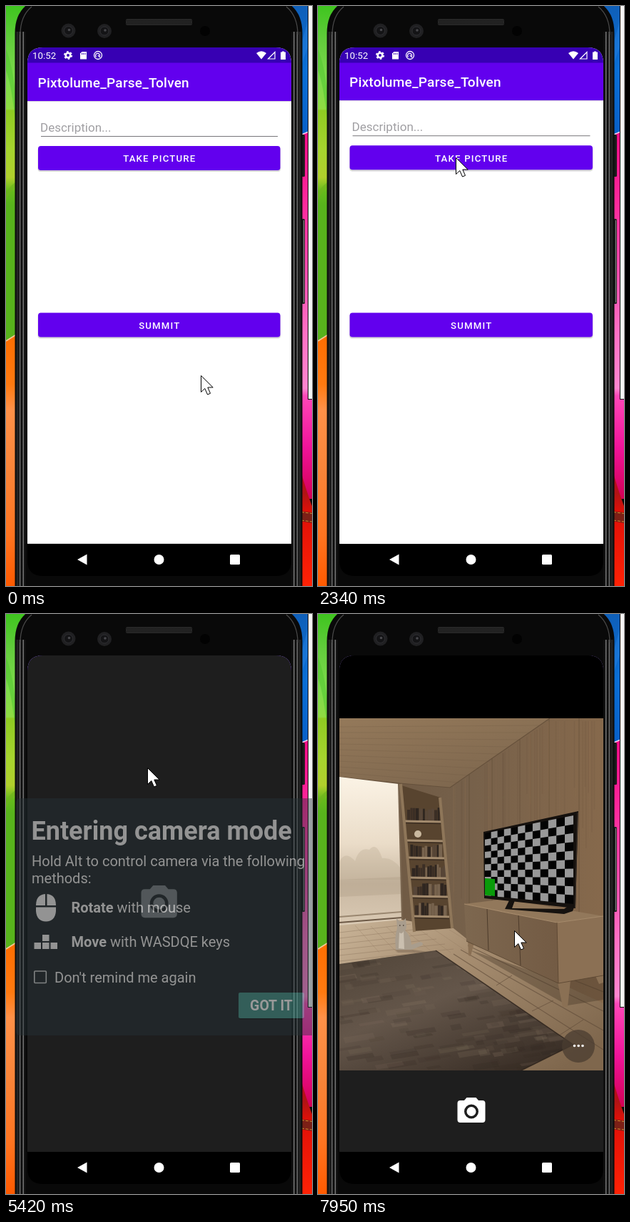
Animation, 429 px wide and 812 px high, one loop 8000 ms. Source, as an HTML page:

```html
<!DOCTYPE html>
<html lang="en">
<head>
<meta charset="utf-8">
<title>Camera demo</title>
<style>
html, body { margin: 0; width: 100%; height: 100%; overflow: hidden; background: #0a0a0a; }
svg { display: block; }
text { font-family: Roboto, "Noto Sans", sans-serif; }
</style>
</head>
<body>
<svg id="stage" width="429" height="812" viewBox="0 0 429 812">
  <defs>
    <linearGradient id="leftWall" x2="0" y2="1">
      <stop offset="0" stop-color="#3fc51f"/><stop offset=".1" stop-color="#62cc3c"/>
      <stop offset=".22" stop-color="#7fdc4c"/><stop offset=".3" stop-color="#8fdb42"/>
      <stop offset=".305" stop-color="#8fcb22"/><stop offset=".42" stop-color="#a6d42e"/>
      <stop offset=".5" stop-color="#b0cf2c"/><stop offset=".54" stop-color="#66bb1c"/>
      <stop offset=".58" stop-color="#58b31c"/>
    </linearGradient>
    <linearGradient id="orange" x2="0" y2="1">
      <stop offset="0" stop-color="#ff6d00"/><stop offset=".2" stop-color="#ff7a10"/>
      <stop offset=".3" stop-color="#ff9148"/><stop offset=".55" stop-color="#f98438"/>
      <stop offset=".8" stop-color="#ff7420"/><stop offset="1" stop-color="#ff5a00"/>
    </linearGradient>
    <linearGradient id="blue" x2="0" y2="1">
      <stop offset="0" stop-color="#0f5fb8"/><stop offset=".5" stop-color="#0a6fd6"/><stop offset="1" stop-color="#0860c8"/>
    </linearGradient>
    <linearGradient id="pink" x2="0" y2="1">
      <stop offset="0" stop-color="#ee0a84"/><stop offset=".2" stop-color="#ff2a9c"/>
      <stop offset=".38" stop-color="#f54cae"/><stop offset=".55" stop-color="#ff70c4"/>
      <stop offset=".7" stop-color="#ff86cf"/><stop offset=".72" stop-color="#ff48b8"/>
      <stop offset=".86" stop-color="#f0149a"/><stop offset="1" stop-color="#d20055"/>
    </linearGradient>
    <linearGradient id="red" x2="0" y2="1">
      <stop offset="0" stop-color="#c3002c"/><stop offset=".25" stop-color="#b01414"/>
      <stop offset=".4" stop-color="#e01008"/><stop offset="1" stop-color="#ff2205"/>
    </linearGradient>
    <linearGradient id="rim">
      <stop offset="0" stop-color="#060606"/><stop offset=".2" stop-color="#2b2b2b"/>
      <stop offset=".32" stop-color="#0a0a0a"/><stop offset=".42" stop-color="#777"/>
      <stop offset=".5" stop-color="#111"/><stop offset=".62" stop-color="#0b0b0b"/>
      <stop offset=".7" stop-color="#8d8d8d"/><stop offset=".78" stop-color="#151515"/>
      <stop offset="1" stop-color="#070707"/>
    </linearGradient>
    <linearGradient id="ceiling" x2=".6" y2="1">
      <stop offset="0" stop-color="#94795a"/><stop offset="1" stop-color="#7e674e"/>
    </linearGradient>
    <linearGradient id="wall">
      <stop offset="0" stop-color="#6b553f"/><stop offset=".45" stop-color="#75604a"/><stop offset="1" stop-color="#86694c"/>
    </linearGradient>
    <linearGradient id="window" x2="0" y2="1">
      <stop offset="0" stop-color="#fbf3e5"/><stop offset=".45" stop-color="#eadcc8"/>
      <stop offset=".72" stop-color="#c9b8a2"/><stop offset="1" stop-color="#d9c9b3"/>
    </linearGradient>
    <linearGradient id="floor" x2="1" y2=".8">
      <stop offset="0" stop-color="#c9b498"/><stop offset=".4" stop-color="#a78e71"/><stop offset="1" stop-color="#7f674d"/>
    </linearGradient>
    <linearGradient id="rug" x2=".8" y2="1">
      <stop offset="0" stop-color="#504438"/><stop offset=".45" stop-color="#64564a"/><stop offset="1" stop-color="#382d25"/>
    </linearGradient>
    <linearGradient id="front">
      <stop offset="0" stop-color="#7d674f"/><stop offset="1" stop-color="#735b44"/>
    </linearGradient>
    <clipPath id="screen"><path d="M30 753V80Q30 58 52 58H378Q400 58 400 80V753Z"/></clipPath>
    <clipPath id="photoBox"><rect x="30" y="146" width="370" height="493"/></clipPath>
    <clipPath id="rugBox"><path d="M30 490 165 471 358 603 285 639H30Z"/></clipPath>
    <g id="cam" fill-rule="evenodd">
      <path d="M13 0H26L29.500 4H35Q39 4 39 8V31Q39 35 35 35H4Q0 35 0 31V8Q0 4 4 4H9.500ZM19.500 9.500A10 10 0 1 0 19.500 29.500A10 10 0 1 0 19.500 9.500ZM19.500 13A6.500 6.500 0 1 1 19.500 26A6.500 6.500 0 1 1 19.500 13Z"/>
    </g>
  </defs>

  <!-- desktop -->
  <g id="desk">
    <rect width="40" height="480" fill="url(#leftWall)"/>
    <path d="M0 262Q8 248 16 246V252Q8 256 0 272Z" fill="#6fb51e" opacity=".7"/>
    <path d="M0 60Q10 85 14 130V170Q8 110 0 90Z" fill="#4fc62e" opacity=".5"/>
    <path d="M0 469 16 459V812H0Z" fill="url(#orange)"/>
    <path d="M0 469 16 459" stroke="#f5c99a" stroke-width="1.500"/>
    <rect x="390" width="39" height="180" fill="url(#blue)"/>
    <path d="M429 0V40L412 90V60Z" fill="#2c86e4" opacity=".4"/>
    <path d="M410 182 429 174V690H410Z" fill="url(#pink)"/>
    <path d="M410 182 429 174" stroke="#f7d6ea" stroke-width="1.500"/>
    <path d="M410 640Q420 676 429 700V812H410Z" fill="url(#red)"/>
    <path d="M412 707 429 709V724L412 721Z" fill="#7c2016"/>
    <path d="M414 708.500 429 710.500M414 720 429 722" stroke="#d08a2c" stroke-dasharray="4 2"/>
    <rect x="423.500" y="-2" width="10" height="552.500" fill="#f7f7f7" stroke="#111"/>
  </g>

  <!-- phone -->
  <rect x="413" y="180" width="6" height="59" rx="1.500" fill="#1c1c1c"/>
  <rect x="413" y="298" width="6" height="119" rx="1.500" fill="#222"/>
  <path d="M417.500 300V415" stroke="#888"/>
  <path d="M12.500 830V38Q12.500 8 34 -5H394Q415.500 8 415.500 38V830Z" fill="#090909"/>
  <rect x="13" y="36" width="16" height="776" fill="url(#rim)"/>
  <rect x="-415" y="36" width="16" height="776" fill="url(#rim)" transform="scale(-1 1)"/>
  <path d="M20 40Q20 14 36 1M409 40Q409 14 393 1" fill="none" stroke="#4a4a4a" stroke-width="1.200"/>
  <g id="sensors"></g>
  <path d="M30 750H400V776Q400 798 378 798H52Q30 798 30 776Z" fill="#000"/>

  <g clip-path="url(#screen)">
    <g id="app">
      <rect x="30" y="58" width="370" height="695" fill="#fff"/>
      <g id="page">
        <rect x="28" y="76" width="374" height="57" fill="#6200ee"/>
        <rect x="28" y="133" width="374" height="1" fill="#d5d1dc"/>
        <text x="44.500" y="113.500" font-size="19" font-weight="500" letter-spacing=".24" fill="#fff">Pixtolume_Parse_Tolven</text>
        <text x="48" y="175.500" font-size="17" fill="#a09fa3">Description...</text>
        <rect x="49" y="182" width="332" height="1" fill="#77767a"/>
        <g id="buttons"></g>
        <rect x="28" y="752" width="374" height="1" fill="#ddd"/>
      </g>
      <rect x="30" y="58" width="370" height="21.500" fill="#3700b3"/>
      <text x="37" y="74" font-size="13.300" fill="#fff">10:52</text>
      <circle cx="87" cy="69" r="3.300" fill="none" stroke="#fff" stroke-width="2.600"/>
      <circle cx="87" cy="69" r="5.200" fill="none" stroke="#fff" stroke-width="1.700" stroke-dasharray="2.720"/>
      <path d="M106.500 64H113V74.500H104V66.500Z" fill="#fff"/>
      <path d="M106.500 66V68M108.700 66V68M111 66V68" stroke="#3700b3"/>
      <circle cx="129" cy="69" r="5.500" fill="none" stroke="#fff" stroke-width="1.300"/>
      <path d="M126.500 71.500A3 3 0 1 1 131.500 70M129 69 132 72" fill="none" stroke="#fff" stroke-width="1.300"/>
      <path d="M351 66Q358 60.500 365 66L358 74.500Z" fill="#fff"/>
      <path d="M377 64.500V74H367.500Z" fill="none" stroke="#fff" stroke-width="1.200"/>
      <path d="M385 64.500H387V63.500H390V64.500H392V75H385Z" fill="#fff"/>
    </g>
    <g id="dark">
      <rect x="30" y="58" width="370" height="695" fill="#1e1e1e"/>
      <use id="hint" href="#cam" transform="translate(189.500 380) scale(1.290)" fill="#757575"/>
    </g>
    <g id="photo">
      <rect x="30" y="58" width="370" height="90" fill="#000"/>
      <rect x="30" y="639" width="370" height="114" fill="#1e1e1e"/>
      <g id="room" clip-path="url(#photoBox)"></g>
      <circle cx="365" cy="605" r="23" fill="#4a3c31" opacity=".75"/>
      <path d="M359.500 604.500h.01M365.200 604.500h.01M371 604.500h.01" stroke="#fff" stroke-width="3.600" stroke-linecap="round"/>
      <use href="#cam" transform="translate(195.500 677)" fill="#fff"/>
    </g>
  </g>
  <g fill="#fff">
    <path d="M100 775 113.500 767.500V782.500Z"/>
    <circle cx="214.500" cy="775" r="7"/>
    <rect x="314" y="768" width="14" height="14" rx="1.500"/>
  </g>

  <g id="dialog">
    <path d="M20 258H429V590H20Q14 590 14 584V264Q14 258 20 258Z" fill="#263238" opacity=".8"/>
    <g fill="#f4f4f4">
      <text x="35.500" y="316" font-size="36" font-weight="700">Entering camera mode</text>
      <g font-size="20">
        <text x="36" y="353">Hold Alt to control camera via the following</text>
        <text x="36" y="377">methods:</text>
        <text x="91.500" y="418"><tspan font-weight="700">Rotate</tspan> with mouse</text>
        <text x="91.500" y="466"><tspan font-weight="700">Move</tspan> with WASDQE keys</text>
        <text x="68" y="516">Don't remind me again</text>
      </g>
      <path d="M55 392V408H42Q42 393 55 392ZM57.500 392Q70 393 70 408H57.500ZM42 410.500H70V416Q69 430 56 430.500Q43 430 42 416Z"/>
      <path d="M51 449H60.500V458H51ZM39.500 460H49V469H39.500ZM51 460H60.500V469H51ZM62.500 460H72V469H62.500Z"/>
    </g>
    <rect x="39.800" y="500" width="16.500" height="16.500" rx="1" fill="none" stroke="#cfd3d5" stroke-width="1.600"/>
    <rect x="326" y="531.500" width="92" height="36" rx="2" fill="#000" opacity=".25"/>
    <rect id="gotIt" x="326" y="530" width="92" height="36" rx="2" fill="#45938a"/>
    <text x="372" y="555" font-size="19.500" font-weight="700" fill="#fff" text-anchor="middle">GOT IT</text>
  </g>

  <path id="cursor" d="M.5 .5V23.500L5.800 18.500 9.500 27 13.500 25.300 9.800 17H17.200Z" fill="#fff" stroke="#000" stroke-linejoin="round"/>
</svg>
<script>
const $ = id => document.getElementById(id);
const NS = 'http://www.w3.org/2000/svg';
const LOOP = 8000;

function add(parent, tag, attrs, text) {
  const el = document.createElementNS(NS, tag);
  for (const k in attrs) el.setAttribute(k, attrs[k]);
  if (text) el.textContent = text;
  parent.appendChild(el);
  return el;
}

let seed = 7;
const rnd = () => (seed = (seed * 16807) % 2147483647) / 2147483647;

function buildSensors() {
  const g = $('sensors');
  for (const [x, y] of [[87.5, 34.5], [138, 35]]) {
    add(g, 'circle', { cx: x, cy: y, r: 10, fill: '#202022' });
    add(g, 'circle', { cx: x, cy: y, r: 6, fill: '#141416', stroke: '#2f2f33' });
    add(g, 'circle', { cx: x + 1, cy: y - 1, r: 1.8, fill: '#48484c' });
  }
  add(g, 'circle', { cx: 279, cy: 35, r: 7, fill: '#020202' });
  add(g, 'rect', { x: 168, y: 18, width: 93, height: 9, rx: 2, fill: '#262626' });
  add(g, 'path', { d: 'M169 20.5H260M170 22.500H260M169 24.500H260', stroke: '#151515', 'stroke-dasharray': '1 1' });
}

function buildButtons() {
  const g = $('buttons');
  for (const [y, label] of [[196, 'TAKE PICTURE'], [429.5, 'SUMMIT']]) {
    add(g, 'rect', { x: 44.5, y: y + 2, width: 340.5, height: 34, rx: 4, fill: '#000', opacity: .16 });
    add(g, 'rect', { x: 45, y, width: 339.5, height: 34, rx: 3.8, fill: '#6200ee' });
    add(g, 'text', {
      x: 215.3, y: y + 22.3, fill: '#fff', 'font-size': 13.2, 'font-weight': 500,
      'letter-spacing': 1.18, 'text-anchor': 'middle'
    }, label);
  }
}

function buildRoom() {
  const g = $('room');
  const fill = (d, color, opacity = 1) => add(g, 'path', { d, fill: color, opacity });
  const line = (d, color, width = 1, opacity = 1) =>
    add(g, 'path', { d, fill: 'none', stroke: color, 'stroke-width': width, opacity });

  fill('M30 146H400V639H30Z', 'url(#wall)');
  fill('M30 146H325L185 243 115 237 30 228Z', 'url(#ceiling)');
  for (let i = 0; i < 9; i++) {
    line(`M30 ${158 + i * 8}L${310 - i * 14} ${156 + i * 10}`, '#6a543e', .8, .3);
  }
  line('M325 146 185 243 115 237 30 228', '#5d4935', 1.2, .7);
  for (const x of [212, 244, 283, 324, 366]) line(`M${x} ${Math.max(146, 243 - (x - 185) * .69)}V430`, '#584530', 1, .45);
  for (let i = 0; i < 45; i++) {
    const x = 190 + rnd() * 210, y = Math.max(150, 245 - (x - 185) * .68);
    line(`M${x} ${y}v${80 + rnd() * 110}`, rnd() < .5 ? '#947858' : '#5f4a36', 1.5, .13);
  }

  // floor
  fill('M30 432 117 428 190 440 215 460 400 545V639H30Z', 'url(#floor)');
  for (let i = 0; i < 6; i++) line(`M30 ${446 + i * 8}L${130 + i * 12} ${434 + i * 7}`, '#8b745c', .8, .55);
  for (let i = 0; i < 7; i++) line(`M${52 + i * 22} ${436 + i}l${34 + i * 3} ${38 - i}`, '#8b745c', .7, .4);
  for (let i = 0; i < 4; i++) line(`M${190 + i * 10} ${476 - i * 6}L400 ${610 - i * 27}`, '#5d4936', 1.2, .6);
  line('M300 556 330 541M338 590 372 568M250 520 272 506', '#5d4936', 1, .6);

  // window
  fill('M30 228 113 238 118 428 30 436Z', 'url(#window)');
  fill('M30 347Q38 330 52 346 58 326 72 330 82 318 90 342 104 340 116 356V372H30Z', '#b9a78f', .32);
  fill('M30 372 117 368V392L30 396Z', '#ab9a84', .35);
  line('M30 424 117 417', '#9a8770', 2);
  line('M30 432 118 425', '#6d5a47', 2);
  line('M113 238 118 428', '#7a6650', 2);

  // ladder shelf
  fill('M117 240 172 257 188 440 134 444Z', '#58442f');
  [290, 317, 341, 369, 395, 423].forEach((y, i) => {
    const x0 = 121 + i * 2.2, x1 = 174 + i * 2;
    if (i !== 1) {
      for (let x = x0 + 4; x < x1 - 4;) {
        const w = 2 + rnd() * 3, h = 13 + rnd() * 6;
        add(g, 'rect', { x, y: y - h, width: w, height: h, fill: ['#3b2e25', '#574638', '#78644f', '#2f2620'][rnd() * 4 | 0] });
        x += w + .4;
      }
    }
    line(`M${x0} ${y}L${x1} ${y + 1}`, '#a38b6e', 3);
    line(`M${x0} ${y + 2.500}L${x1} ${y + 3.500}`, '#3c2e22', 1.5);
  });
  add(g, 'circle', { cx: 140, cy: 308, r: 5, fill: '#c9b89f' });
  line('M116 238 135 445', '#8e7659', 4);
  line('M171 257 188 440', '#8e7659', 4);

  // cat
  fill('M109 470Q107 452 111 440L110 426 114 430H119L123 426 124 437Q124 441 122 443 130 450 131 463L143 459Q149 460 146 464L131 470Z', '#a99d8d');
  fill('M113 468 114 446Q118 449 120 444L121 469Z', '#cabfaf');
  line('M114 436h1.500M119 436h1.500', '#4d4339', 1.3);
  fill('M108 470H134L160 474H112Z', '#7b6752', .5);

  // rug
  fill('M30 490 165 471 358 603 285 639H30Z', 'url(#rug)');
  const rug = add(g, 'g', { 'clip-path': 'url(#rugBox)' });
  for (let i = 0; i < 170; i++) {
    const x = 20 + rnd() * 320, y = 472 + rnd() * 165, w = 10 + rnd() * 32;
    add(rug, 'path', {
      d: `M${x} ${y}l${w} ${-w * .16}l3 ${3 + rnd() * 5}l${-w} ${w * .16}Z`,
      fill: rnd() < .45 ? '#8c7a67' : '#2b221c', opacity: .06 + rnd() * .16
    });
  }
  line('M165 471 358 603 285 639', '#2c221b', 1.5, .8);

  // cabinet
  fill('M212 470 350 548 400 540V505L335 512Z', '#3c2e22', .35);
  fill('M210 455 219 460 214 479 211 478ZM268 480 280 485 276 490ZM335 510 354 513 350 550 343 550ZM386 500 400 502V516L394 518Z', '#8a7054');
  fill('M205 406 262 399 400 423 335 432Z', '#92785b');
  fill('M205 406 335 432 337 517 208 458Z', 'url(#front)');
  fill('M335 432 400 423V506L337 517Z', '#8b7054');
  line('M205 406 335 432 400 423', '#a58a6b', 1.2);
  line('M237 413 239 471M281 422 284 492', '#4d3b2b', 1);
  line('M208 458 337 517 400 506M335 432 337 517', '#57432f', 1, .8);

  // television
  fill('M262 413 268 401H276L272 412 345 413 352 408H360L357 416 345 420Z', '#16120f');
  fill('M232 305 365 276 361 412 233 398Z', '#15110e');
  line('M364 278 360.500 411', '#3a3028', 1.2);
  const mix = (a, b, k) => a + (b - a) * k;
  const cols = 12, rows = 10;
  const at = (c, r) => {
    const u = c / cols, v = r / rows, s = u * (1 + .22 * u) / 1.22;
    return `${mix(234, 358, s).toFixed(1)} ${mix(mix(307, 282, s), mix(394, 406, s), v).toFixed(1)}`;
  };
  fill(`M${at(0, 0)}L${at(cols, 0)} ${at(cols, rows)} ${at(0, rows)}Z`, '#040404');
  let cells = '';
  for (let c = 0; c < cols; c++) {
    for (let r = 0; r < rows; r++) {
      if ((c + r) % 2) cells += `M${at(c, r)}L${at(c + 1, r)} ${at(c + 1, r + 1)} ${at(c, r + 1)}Z`;
    }
  }
  fill(cells, '#989898');
  fill('M234 370 248 371V395L234 393.500Z', '#0a9a0a');
}

// keys: [time, value, value...], linear between, held at both ends
function track(keys, t) {
  let i = keys.findIndex(k => k[0] > t);
  if (i === 0) return keys[0].slice(1);
  if (i < 0) return keys[keys.length - 1].slice(1);
  const a = keys[i - 1], b = keys[i], k = (t - a[0]) / (b[0] - a[0]);
  return a.slice(1).map((v, n) => v + (b[n + 1] - v) * k);
}

const pointer = [
  [0, 273, 517], [60, 273, 517], [290, 226, 368], [510, 181, 226], [830, 181, 224], [970, 182, 221],
  [1510, 188, 200], [1740, 175, 185], [1820, 193, 202], [1970, 192, 204], [2130, 193, 212],
  [2340, 193, 212], [2580, 194, 212], [2920, 194, 211], [3070, 194, 208], [4200, 194, 209],
  [4270, 198, 218], [4940, 198, 217], [5030, 198, 215], [5940, 198, 215], [6190, 364, 455],
  [6430, 374, 542], [6660, 364, 544], [6830, 363, 543], [7060, 365, 543], [7380, 365, 541],
  [7770, 356, 528], [7909, 356, 528], [7910, 318, 488], [7949, 318, 488], [7950, 275, 443]
];
const zoom = [[960, 1], [1120, 1.003]];
const panel = [[5340, 0], [5420, .55], [5510, 1], [6980, 1], [7060, .52], [7300, 0]];
const step = (t, a, b) => t < a ? 0 : t < b ? .5 : 1;

function show(id, opacity) {
  $(id).setAttribute('opacity', opacity);
  $(id).style.display = opacity > 0 ? '' : 'none';
}

function draw(t) {
  const [x, y] = track(pointer, t);
  $('cursor').setAttribute('transform', `translate(${Math.round(x)} ${Math.round(y)})`);
  $('page').setAttribute('transform', `translate(215 440) scale(${track(zoom, t)[0]}) translate(-215 -440)`);
  show('dark', step(t, 2510, 2580));
  show('hint', step(t, 3620, 3690));
  show('photo', step(t, 5650, 5730));
  show('dialog', track(panel, t)[0]);
  $('gotIt').setAttribute('fill', t > 6980 ? '#70b0a6' : '#45938a');
}

buildSensors();
buildButtons();
buildRoom();
draw(0);
let start;
function frame(now) {
  if (start === undefined) start = now;
  draw((now - start) % LOOP);
  requestAnimationFrame(frame);
}
requestAnimationFrame(frame);
</script>
</body>
</html>
```
